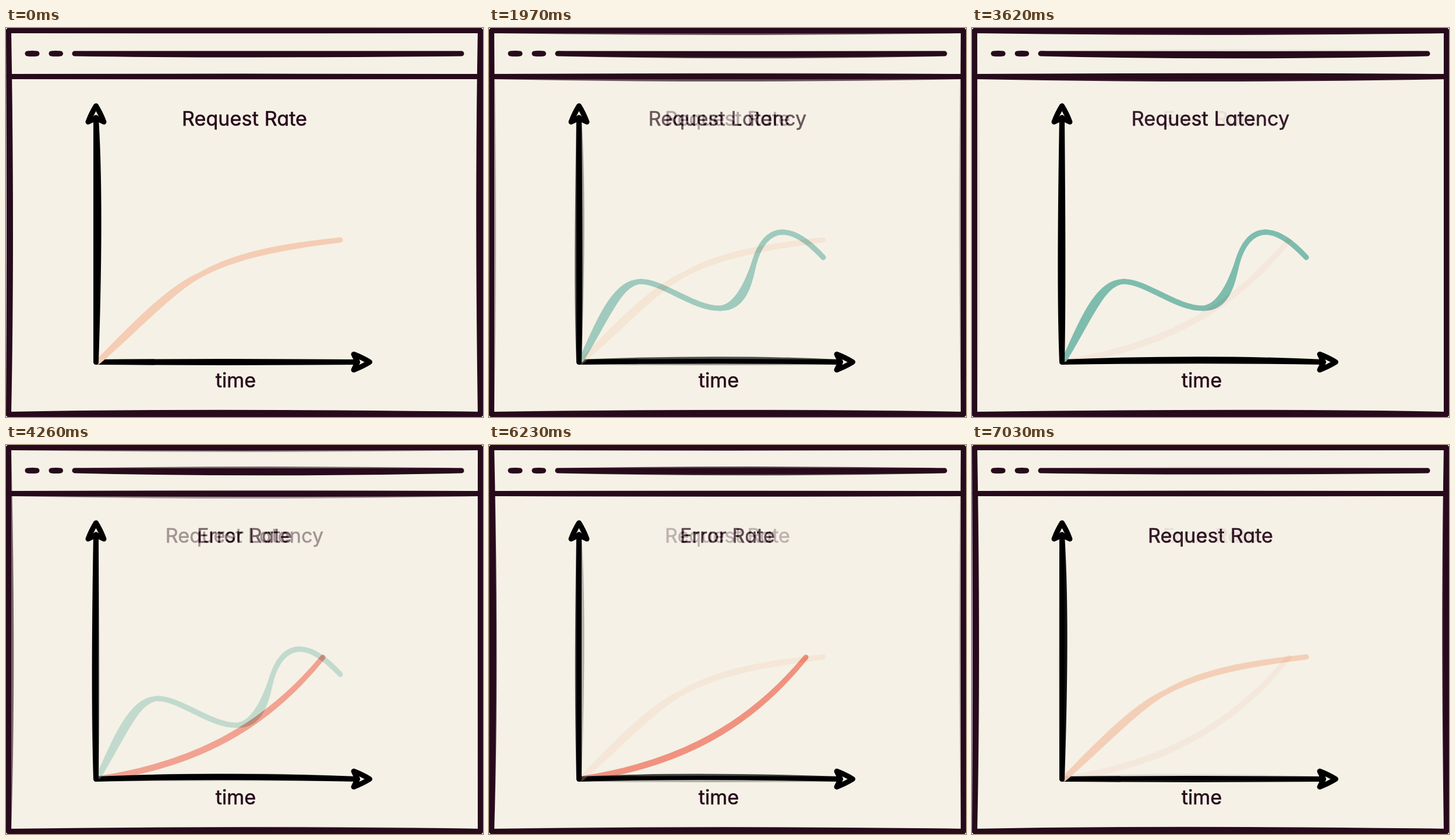
An HTML page for the animation above (7.11 s loop, 819 by 669 pixels).

```html
<!DOCTYPE html>
<html lang="en">
<head>
<meta charset="utf-8">
<title>Request metrics</title>
<style>
  html, body { margin: 0; width: 100%; height: 100%; overflow: hidden; background: #fff; }
  svg { display: block; width: 100vw; height: 100vh; }
  text {
    font: 400 34px Inter, "Open Sans", sans-serif;
    font-feature-settings: "cv11";
    letter-spacing: .15px;
    text-anchor: middle;
    fill: #270a1b; stroke: #270a1b; stroke-width: .6; stroke-linejoin: round;
  }
</style>
</head>
<body>
<svg id="stage" viewBox="0 0 819 669"></svg>
<script>
const INK = '#270a1b', PAPER = '#f5f1e6';
const HOLD = 1250, STEP = 80, STEPS = 15;
const SPAN = HOLD + STEP * (STEPS - 1);

const shape = (d, color, width = 9) =>
  `<path d="${d}" fill="${color}" stroke="${color}" stroke-width="${width}" stroke-linecap="round" stroke-linejoin="round"/>`;

// Hand-drawn bar: its two edges bow sideways by a and b, peaking near position k.
function bar(x1, y1, x2, y2, [a, b, k = .5], color = INK) {
  const across = Math.abs(x2 - x1) > Math.abs(y2 - y1);
  const ctrl = bow => {
    const x = x1 + (x2 - x1) * k, y = y1 + (y2 - y1) * k;
    return across ? `${x} ${y + 2 * bow}` : `${x + 2 * bow} ${y}`;
  };
  return shape(`M${x1} ${y1}Q${ctrl(a)} ${x2} ${y2}Q${ctrl(b)} ${x1} ${y1}Z`, color);
}

// Brush stroke between two cubics that share their ends.
const brush = (from, c1, c2, to, d1, d2, color) =>
  shape(`M${from}C${c1} ${c2} ${to}C${d2} ${d1} ${from}Z`, color);

const arrow = turn =>
  `<path d="M0 0Q-7.5 12-13.5 27.5L0 21L13.5 27.5Q7.5 12 0 0Z" transform="${turn}" fill="none" stroke="#000" stroke-width="9" stroke-linejoin="round"/>`;

const PEACH = '#f4cdb4', TEAL = '#76b8aa', RED = '#ef6f59';

const scenes = [
  {
    title: 'Request Rate',
    top: [0, .3], right: [-2.6, 0, .45], bottom: [-3.2, 0, .4], left: [.9, 3, .55],
    head: [-.4, .3], address: [-.4, 1.9, .4],
    xAxis: [-.9, .9], yAxis: [0, 4.6, .35],
    curve:
      brush('158 574', '207 524', '277 449', '333 425', '213 528', '283 452', PEACH) +
      brush('333 425', '395 388', '480 374.5', '574 364.5', '395 391', '480 376', PEACH)
  },
  {
    title: 'Request Latency',
    top: [0, 3], right: [0, 0], bottom: [-3.2, 0, .6], left: [0, 0],
    head: [-1.2, 4], address: [.5, 3.8],
    xAxis: [-4.8, -1.8, .55], yAxis: [-2.6, 1.4, .72],
    curve:
      brush('159 570', '195 489', '219 436', '261 436', '204 496', '226 436', TEAL) +
      brush('261 436', '300 436', '350 482', '397 482', '300 437', '350 483', TEAL) +
      brush('397 482', '440 483', '448 435', '455 405', '424 479', '443 440', TEAL) +
      brush('455 405', '464 372', '480 351', '504 351', '464 373', '480 352', TEAL) +
      brush('504 351', '532 351', '560 379', '574 394.5', '532 351', '560 380', TEAL)
  },
  {
    title: 'Error Rate',
    top: [0, .7], right: [-.2, 0], bottom: [-2.7, 0], left: [0, 4.3, .58],
    head: [-.3, 1], address: [-2.4, 3.8],
    xAxis: [-4.4, -3, .42], yAxis: [-2.2, .2, .6],
    curveBelow: true,
    curve: brush('158 574', '330 548', '450 479', '544 365', '330 552', '450 482', RED)
  }
];

function draw(s) {
  const xAxis = bar(155, 574.5, 603, 574.5, s.xAxis, '#000');
  const axes = bar(154.5, 154, 154.5, 574.5, s.yAxis, '#000') +
    arrow('translate(154.5 134)') + arrow('translate(624.5 574.5) rotate(90)');
  return `<rect width="819" height="669" fill="#fff"/>
    <rect x="4" y="4" width="811" height="661" fill="${PAPER}"/>` +
    bar(4.5, 4.5, 814.5, 4.5, s.top) +
    bar(814.5, 4.5, 814.5, 664.5, s.right) +
    bar(4.5, 664.5, 814.5, 664.5, s.bottom) +
    bar(4.5, 4.5, 4.5, 664.5, s.left) +
    bar(5, 83.5, 814, 83.5, s.head) +
    bar(37, 44, 53, 44, [-.5, .5]) +
    bar(78, 44, 93.5, 44, [-.5, .5]) +
    bar(118, 44, 782, 44, s.address) +
    (s.curveBelow ? s.curve + xAxis : xAxis + s.curve) + axes +
    `<text x="409.5" y="168">${s.title}</text><text x="394.5" y="618">time</text>`;
}

const stage = document.getElementById('stage');
stage.innerHTML = scenes.map(s => `<g>${draw(s)}</g>`).join('');
const layers = [...stage.children];
let shown = -1;

// The next scene dissolves over the current one in even steps.
function update(time) {
  const t = time % (SPAN * layers.length);
  const now = Math.floor(t / SPAN), p = t - now * SPAN;
  const mix = p < HOLD ? 0 : (Math.floor((p - HOLD) / STEP) + 1) / STEPS;
  const next = (now + 1) % layers.length;
  if (now !== shown) {
    stage.append(layers[now], layers[next]);
    shown = now;
  }
  layers.forEach((g, i) => g.setAttribute('opacity', i === now ? 1 : i === next ? mix : 0));
}

const start = performance.now();
function tick() {
  update(performance.now() - start);
  requestAnimationFrame(tick);
}
tick();
</script>
</body>
</html>
```
